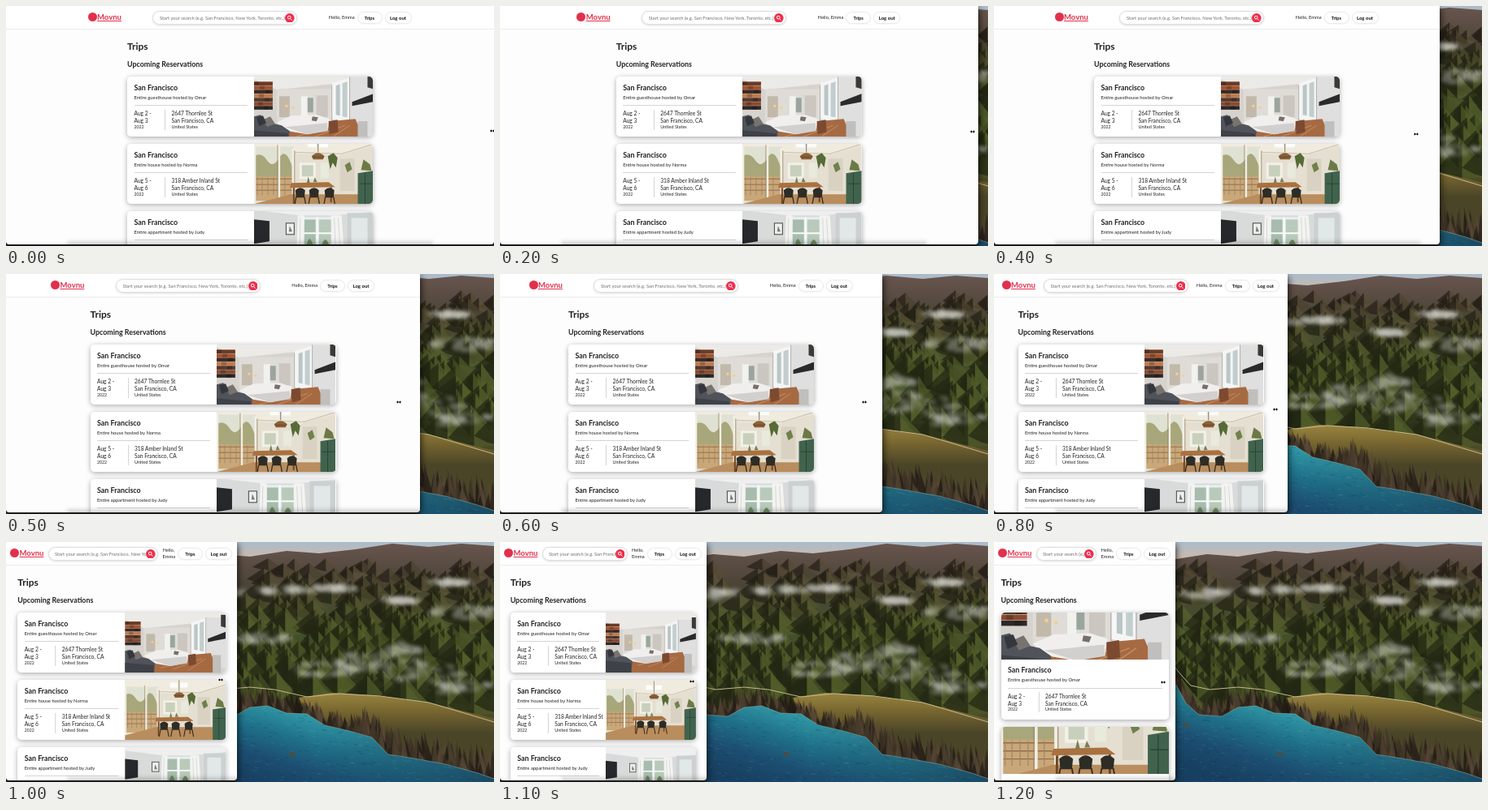
An HTML page with a canvas for the animation above (1.3 s loop, 600 by 296 pixels).

```html
<!DOCTYPE html>
<html lang="en">
<head>
<meta charset="utf-8">
<title>Trips</title>
<style>
html, body { margin: 0; width: 100%; height: 100%; overflow: hidden; background: #16211f; }
body { position: relative; font: 5.85px Lato, "Open Sans", sans-serif; color: #222; }
canvas { position: absolute; left: 0; top: 0; }
#win { position: absolute; left: 0; top: 0; height: 294px; overflow: hidden; background: #fdfdfd;
  border-radius: 0 0 4px 4px; box-shadow: 0 2px 0 #1b1b1b, 1px 3px 9px rgba(0,0,0,.75); }
#dock { position: absolute; left: 75px; top: 288px; width: 450px; height: 8px;
  background: linear-gradient(transparent, #0004); filter: blur(2px); }
.t { position: absolute; line-height: 0; white-space: nowrap; }
b { font-weight: 700; }

header { height: 28px; border-bottom: 1px solid #ececec; background: #fff; }
nav { width: min(400px, 100% - 18px); height: 28px; margin: 0 auto; display: flex;
  align-items: center; justify-content: space-between; }
.logo { position: relative; flex: none; width: 42px; height: 28px; color: #e2304c; }
.logo i { position: absolute; left: .5px; top: 8px; width: 11px; height: 11px; border-radius: 50%; background: #e2304c; }
.logo b { left: 12px; top: 13.7px; font-size: 9.5px; text-decoration: underline; text-decoration-thickness: .8px; }
.search { position: relative; flex: 0 1 178px; height: 17px; box-sizing: border-box; border: .8px solid #ddd;
  border-radius: 9px; background: #fff; box-shadow: 0 1px 3px #0002; }
.search div { position: absolute; left: 7.5px; right: 14px; top: 0; height: 16px; line-height: 16px;
  overflow: hidden; white-space: nowrap; color: #707070; font-size: 5.8px; }
.search svg { position: absolute; right: 2.5px; top: 2px; width: 11.6px; height: 11.6px; }
.user { flex: none; display: flex; align-items: center; padding-right: 1.5px; font-size: 5.75px; line-height: 8px; }
.user b { box-sizing: border-box; width: 31px; height: 15px; margin-left: 3px; border: .8px solid #e9e9e9;
  border-radius: 8px; text-align: center; line-height: 13.5px; box-shadow: 0 .5px 1.5px #0001; color: #111; }
.user b + b { width: 33px; font-size: 6px; }
.narrow nav { width: calc(100% - 9px); gap: 5px; }
.narrow .hello { width: min-content; }

main { position: absolute; top: 0; left: 50%; transform: translateX(-50%); width: min(302px, 90%); }
.stack main { width: calc(100% - 17px); }
.card { position: absolute; left: 0; width: 100%; height: 74.5px; border-radius: 5px; overflow: hidden; background: #fff; }
.shade { position: absolute; left: 0; width: 100%; height: 74.5px; border-radius: 5px; box-shadow: 0 1.5px 6px #0005; }
.info { position: absolute; left: 0; top: 0; width: 51.5%; height: 74px; }
.rule { position: absolute; left: 8.5px; right: 8px; top: 35.5px; height: .8px; background: #d4d4d4; }
.bar { position: absolute; left: 46px; top: 41px; width: .8px; height: 25px; background: #d4d4d4; }
.card > svg { position: absolute; left: 51.5%; top: 0; width: 48.5%; height: 100%; }
.stack .info { top: 57.5px; width: 100%; }
.stack .card > svg { left: 0; width: 100%; height: 58px; }
.stack .card, .stack .shade { height: 132px; }
#cursor { position: absolute; width: 8px; height: 6px; margin: -3px 0 0 -4px; }
</style>
</head>
<body>
<canvas id="land" width="600" height="296"></canvas>
<div id="win">
  <header><nav>
    <div class="logo"><i></i><b class="t">Movnu</b></div>
    <div class="search">
      <div>Start your search (e.g. San Francisco, New York, Toronto, etc.)</div>
      <svg viewBox="0 0 12 12"><circle cx="6" cy="6" r="6" fill="#ee2f4d"/><g fill="none" stroke="#fff"><circle cx="5.4" cy="5.3" r="1.9"/><path d="M6.8 6.8 8.8 8.8"/></g></svg>
    </div>
    <div class="user"><span class="hello">Hello, Emma</span><b>Trips</b><b>Log out</b></div>
  </nav></header>
  <main>
    <b class="t" style="top:49.7px;font-size:12px">Trips</b>
    <b class="t" style="top:72px;font-size:8.9px">Upcoming Reservations</b>
    <div id="cards"></div>
  </main>
  <div id="dock"></div>
</div>
<svg id="cursor" viewBox="-4 -3 8 6"><path d="M-3 0-1-1.7V-.6H1V-1.7L3 0 1 1.7V.6H-1V1.7Z" stroke="#fff" stroke-width=".8" paint-order="stroke"/></svg>

<script>
const $ = id => document.getElementById(id);

// Rooms, drawn in a 147-wide space
const box = (x, y, w, h, fill) => `<rect x="${x}" y="${y}" width="${w}" height="${h}" fill="${fill}"/>`;
const path = (d, fill) => `<path d="${d}" fill="${fill}"/>`;
const line = (d, stroke, width = 1) => `<path d="${d}" fill="none" stroke="${stroke}" stroke-width="${width}"/>`;

const planks = ['#6b3a25', '#a3542f', '#3a2a24', '#c07a4c', '#54382d', '#8b4a2e', '#2f2725']
  .map((c, i) => box(0, 6 + i * 5, 23, 4.6, c) + box(i * 7 % 15, 6 + i * 5, 6, 4.6, '#0003')).join('');

const bedroom = box(0, -12, 147, 98, '#d6d3cf') + path('M0-12H147V4L105 8 28 16 0 3Z', '#eceae7') + planks +
  box(28, 15, 68, 40, '#dfdcd7') + box(31, 24, 13, 26, '#c2b9aa') + box(58, 24, 8, 25, '#f1f1ee') +
  box(66, 26, 7, 18, '#9ba59f') + box(77, 23, 14, 27, '#cbc6bf') +
  path('M96 8 118 1V58L96 52Z', '#f4f5f4') + path('M101 11 106 9V48L101 47Z', '#b9c5c6') + path('M109 8 115 6V50L109 49Z', '#c2cdcd') +
  path('M118 0H147V74H124L118 58Z', '#dedfde') + line('M118 0V60M96 10V54', '#b5b2ad') +
  path('M38 60 125 52 140 86H28Z', '#a66a43') + line('M52 74 95 62M70 76 112 60M92 78 118 60', '#c98c60') +
  path('M28 56 46 48 78 47 93 52 91 66 66 71 36 66Z', '#f0efed') + path('M38 62 90 57 91 67 66 71Z', '#d2d0cf') +
  path('M72 49 79 50 77 55 71 54Z', '#77706a') + path('M92 55 103 53 104 68 93 71Z', '#7b4a31') +
  path('M0 49 8 47 16 56 34 60 44 67 42 86H0Z', '#505359') + path('M0 66 42 70V86H0Z', '#3e4147') +
  path('M11 53 20 49 26 58 16 62Z', '#77736f') + path('M3 50 11 48 15 57 6 61Z', '#34373d') +
  path('M121 31 147 21V31L121 36Z', '#2b2a2b') + path('M140-4H147V15L140 13Z', '#3c3936') + box(128, 55, 12, 31, '#c0bfbd') +
  '<g fill="#f4cf8a"><circle cx="40" cy="36" r="1.7"/><circle cx="48" cy="38" r="1.7"/></g>';

const chair = x => path(`M${x} 57Q${x + 6} 51 ${x + 12} 57L${x + 11} 66H${x + 1}Z`, '#2d2c25') +
  line(`M${x + 1} 65 ${x - 1} 76M${x + 11} 65 ${x + 13} 76`, '#322b22', 1.3);
const dining = box(0, -12, 147, 98, '#e5dfd2') + path('M0-12H147V2L105 14 52 12 0 2Z', '#f0ebdf') +
  path('M66-3H76L77 4H66ZM81-3H92L91 4H80Z', '#fcfdfb') + line('M50 10 108 12 147 0', '#cfc5b1', 1.4) +
  box(0, 3, 49, 72, '#dfe2d2') + path('M0 15Q9 9 16 20T31 17 47 28V48H0Z', '#a8a77b') +
  path('M0 40H48V70H0Z', '#c9a779') + line('M0 43H47M0 50H47M0 57H47', '#8d704f') +
  line('M4 41V63M10 41V63M17 41V63M24 41V63M38 41V63', '#a18360', .8) +
  line('M1 2V76M31 1V76M48 5V72', '#f1eee4', 2.5) + line('M29 1V76M50 8V69', '#9a8767', .8) +
  box(56, 23, 20, 20, '#f3f1e7') + box(59, 26, 14, 14, '#c8d0bb') + box(82, 23, 10, 19, '#e8eadc') + box(106, 18, 18, 40, '#d9d2c3') +
  path('M0 74 45 62H128L147 74V86H0Z', '#b98d5d') +
  path('M46 48 92 47 100 53 44 54Z', '#a9713f') + line('M49 54V75M95 53V72', '#714522', 2) +
  chair(51) + chair(68) + chair(87) + path('M65 48 67 40 69 48ZM73 47 75 41 78 47Z', '#768057') +
  line('M79-10V10', '#5a4a39', .7) + path('M71 15Q79 7 87 15L85 19H73Z', '#8a6037') + line('M72 16H86', '#5f3e22', .8) +
  path('M91 15 98 11 103 17 101 29 97 23 94 31Z', '#566b36') + path('M112 26 118 22 121 31 115 35Z', '#70814c') +
  path('M128 36 147 33V86H128Z', '#41634d') + line('M137 36V86M130 49H146', '#294638') + path('M132 32 135 19 143 25 145 33Z', '#6b7a45');

const lounge = box(0, -12, 147, 98, '#d9dbda') + path('M0-12H147V0L100 5H56L0-2Z', '#eeefee') +
  path('M0 10 19 12V37L0 40Z', '#26282b') + box(39, 14, 11, 15, '#404443') + box(40, 15, 9, 13, '#eeeeea') + path('M43 25 44 18 47 25Z', '#777') +
  box(58, 7, 41, 44, '#e8f0ef') + box(62, 10, 14, 38, '#a8bcae') + box(80, 10, 15, 38, '#b9cabb') +
  path('M64 46Q68 22 74 46M82 46Q88 24 94 46', '#6e8862') + line('M78 7V51M59 27H98', '#f8faf9', 2) +
  path('M54 5H62L60 60H52ZM95 5H108L112 64H97Z', '#f3f3f1') + line('M99 8 101 60M104 8 107 60M57 8 56 58', '#cfd1d0', .8) +
  box(115, 2, 32, 58, '#cbd0d0') + box(120, 8, 20, 40, '#e2e8e8') + path('M26 57 70 50 114 57V86H20Z', '#a9aaa7') + box(0, 46, 28, 40, '#ad9473');

const stays = [
  ['guesthouse', 'Omar', 2, '2647 Thornlee St', bedroom],
  ['house', 'Norma', 5, '318 Amber Inland St', dining],
  ['appartment', 'Judy', 9, '', lounge],
];
const text = (x, y, size, str, tag = 'span') => `<${tag} class="t" style="left:${x}px;top:${y}px;font-size:${size}px">${str}</${tag}>`;
$('cards').innerHTML = stays.map(([kind, host, day, street, room]) => `<div class="shade"></div><div class="card">
  <div class="info">${text(8.5, 14.3, 8.9, 'San Francisco', 'b')}
  ${text(8.5, 26.2, 5.86, `Entire ${kind} hosted by ${host}`)}<div class="rule"></div><div class="bar"></div>
  ${text(8.5, 45.8, 6.65, `Aug ${day} -`)}${text(8.5, 54.6, 6.65, `Aug ${day + 1}`)}${text(8.5, 62.3, 5.2, '2022')}
  ${text(54.5, 45.8, 6.65, street)}${text(54.5, 54.6, 6.65, 'San Francisco, CA')}${text(54.5, 62.3, 5.5, 'United States')}
  </div><svg preserveAspectRatio="xMidYMid slice">${room}</svg></div>`).join('');

// Coastal landscape
const ctx = $('land').getContext('2d');
let seed = 11;
const rnd = (a = 0, b = 1) => a + (b - a) * ((seed = seed * 16807 % 2147483647) / 2147483647);
const trace = pts => { ctx.beginPath(); pts.forEach(p => ctx.lineTo(...p)); };
const fill = (color, pts) => { ctx.fillStyle = color; trace(pts); ctx.fill(); };
const fade = (x0, y0, x1, y1, ...colors) => {
  const g = ctx.createLinearGradient(x0, y0, x1, y1);
  colors.forEach((c, i) => g.addColorStop(i / (colors.length - 1), c));
  return g;
};
const stroke = (color, width, pts) => { ctx.strokeStyle = color; ctx.lineWidth = width; trace(pts); ctx.stroke(); };

function drawLand() {
  ctx.fillStyle = fade(0, 0, 0, 22, '#a9bccb', '#d0b9a9');
  ctx.fillRect(0, 0, 600, 296);
  fill(fade(0, 5, 0, 200, '#66544d', '#4a4336', '#43512b', '#3d4b27', '#4a4a28'),
    [[0, 22], [224, 21], [262, 15], [300, 18], [345, 11], [385, 14], [430, 9], [475, 2], [520, 6], [560, 2], [600, 5], [600, 296], [0, 296]]);
  // Overlapping spurs, lit from the right, brown far away and green near by
  for (let y = 20; y < 168; y += 3) {
    for (let i = 0; i < 7; i++) {
      const x = rnd(190, 620), r = rnd(9, 19) + y * .13, h = rnd(10, 16) + y * .17, k = Math.min(1, y / 95);
      const tone = f => `rgba(${(84 - 4 * k) * f},${(65 + 26 * k) * f},${(55 - 14 * k) * f},.72)`;
      fill(tone(.43), [[x, y], [x - r, y + h * .8], [x - r * .5, y + h], [x + 1, y + h * 1.1]]);
      fill(tone(rnd(.85, 1.12)), [[x, y], [x + r * .4, y + h * .45], [x + r, y + h], [x, y + h * 1.1]]);
    }
  }
  fill(fade(0, 185, 0, 235, '#9b8640', '#75642f', '#4b4528'),
    [[360, 192], [400, 186], [450, 189], [520, 198], [600, 218], [600, 296], [480, 250], [370, 215]]);
  const coast = [[0, 185], [224, 176], [236, 199], [252, 213], [280, 215], [300, 204], [322, 202], [345, 211], [370, 212],
    [392, 226], [422, 233], [450, 241], [470, 262], [502, 267], [540, 274], [580, 285], [600, 292]];
  // Cliffs
  for (let i = 1; i < coast.length - 1; i++) {
    const [a, b] = [coast[i], coast[i + 1]];
    for (let n = 0; n < 30; n++) {
      const k = rnd(), x = a[0] + (b[0] - a[0]) * k, y = a[1] + (b[1] - a[1]) * k, h = rnd(5, x > 440 ? 38 : 25), v = rnd(28, 92);
      fill(`rgba(${v},${v * .82},${v * .62},.75)`, [[x - 5, y + 4], [x + rnd(-6, 2), y - h], [x + 5, y + 4]]);
    }
  }
  fill(fade(330, 200, 300, 296, '#3199a6', '#1f7089', '#1c4d70', '#173f60'), [...coast, [600, 296], [0, 296]]);
  fill(fade(380, 0, 600, 0, '#16385400', '#163854cc'), [...coast, [600, 296], [0, 296]]);
  stroke('#a9c5bd66', 1, coast.slice(1));
  ctx.save();
  trace([...coast, [600, 296], [0, 296]]);
  ctx.clip();
  for (let i = 0; i < 500; i++) {
    const x = rnd(215, 600), y = rnd(200, 296);
    stroke(i % 2 ? '#79b5c426' : '#0a284430', 1, [[x, y], [x + rnd(2, 7), y + rnd(-1, 2)]]);
  }
  ctx.restore();
  for (const [x, y] of [[236, 226], [352, 262]]) fill('#4b4d43', [[x - 5, y + 2], [x - 2, y - 3], [x + 2, y - 2], [x + 5, y + 2]]);
  stroke('#c6b78b', 1, [[222, 154], [231, 165], [242, 177], [265, 182], [300, 179], [330, 182], [370, 191], [410, 187], [460, 190], [520, 198], [600, 222]]);
  // Clouds as scattered soft puffs
  const clouds = [[270, 64, 38, 5], [345, 60, 32, 5], [405, 57, 25, 4], [545, 50, 24, 3], [485, 72, 18, 4], [562, 86, 40, 8],
    [310, 119, 40, 5], [395, 157, 38, 10], [435, 148, 36, 12], [490, 138, 24, 14], [515, 160, 48, 14], [560, 179, 38, 8]];
  ctx.filter = 'blur(2.5px)';
  for (const [x, y, rx, ry] of clouds) {
    for (let i = 0; i < 26; i++) {
      const a = rnd(0, 6.3), d = Math.sqrt(rnd());
      ctx.fillStyle = 'rgba(218,219,212,.27)';
      ctx.beginPath();
      ctx.ellipse(x + rx * d * Math.cos(a), y + ry * d * Math.sin(a), rnd(4, 11), rnd(1.5, 4), .15, 0, 7);
      ctx.fill();
    }
  }
  ctx.filter = 'none';
}
drawLand();

// Keys every 200 ms; the picture steps every 100 ms
const widths = [600, 587.5, 548, 470, 361, 284, 223];
const cursorX = [598, 581, 518.5, 447.5, 345.5, 264, 208];
const cursorY = [154, 155, 158, 158, 166.5, 170, 173];
const at = (keys, p) => {
  const i = Math.floor(p), next = keys[Math.min(i + 1, keys.length - 1)];
  return keys[i] + (next - keys[i]) * (p - i);
};
const cards = [...document.querySelectorAll('.card')], shades = [...document.querySelectorAll('.shade')];

function frame(now) {
  const p = Math.floor(now % 1300 / 100) / 2, w = at(widths, p), stack = w < 240;
  $('win').style.width = w + 'px';
  $('win').className = (w < 345 ? 'narrow ' : '') + (stack ? 'stack' : '');
  cards.forEach((card, i) => {
    card.style.top = shades[i].style.top = 86.7 + i * (stack ? 141.3 : 82.9) + 'px';
    card.lastChild.setAttribute('viewBox', stack ? '0 29 147 41' : '0 -12 147 98');
  });
  $('cursor').style.left = at(cursorX, p) + 'px';
  $('cursor').style.top = at(cursorY, p) + 'px';
  requestAnimationFrame(frame);
}
frame(performance.now());
</script>
</body>
</html>
```
